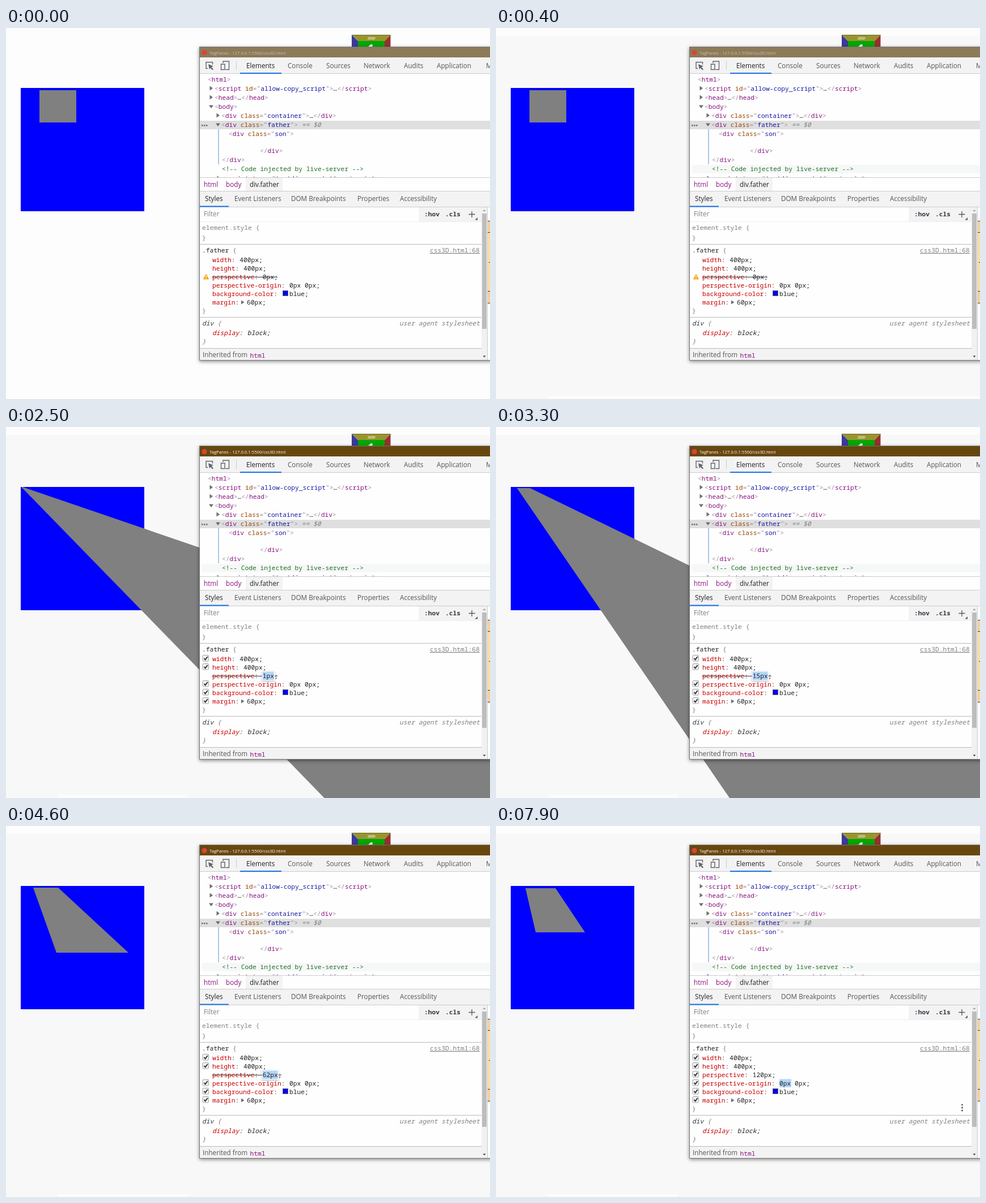
These frames come from a looping animation (854x656 px, 8 s). An HTML page:

```html
<!DOCTYPE html>
<html lang="en">
<head>
<meta charset="utf-8">
<title>Perspective inspector</title>
<style>
  html, body { margin: 0; width: 100%; height: 100%; overflow: hidden; background: #fdfdfd; }
  svg { display: block; }
  text { white-space: pre; fill: #303942; }
  .mono { font: 11.27px "Noto Sans Mono", monospace; }
  .sans { font: 11.7px "Open Sans", sans-serif; fill: #555; }
  .title { font: 7.7px "Open Sans", sans-serif; }
  .italic { font-style: italic; }
  .bold { font-weight: 600; }
  .name { fill: #881280; }
  .attr { fill: #994500; }
  .value { fill: #1a1aa6; }
  .punct { fill: #a08a9e; }
  .prop { fill: #c80000; }
  .plain { fill: #222; }
  .grey { fill: #808080; }
  .comment { fill: #236e25; }
</style>
</head>
<body>
<svg width="854" height="656" viewBox="0 0 854 656">
  <defs>
    <filter id="windowShadow" x="-5%" y="-5%" width="110%" height="110%">
      <feDropShadow dx="0" dy="2" stdDeviation="3" flood-opacity=".45"/>
    </filter>
    <filter id="boxShadow" x="-30%" y="-50%" width="160%" height="200%">
      <feDropShadow dx="0" dy="1" stdDeviation="1.5" flood-opacity=".35"/>
    </filter>
    <clipPath id="treeClip"><path d="M342 80H854V264H342z"/></clipPath>
  </defs>

  <rect width="854" height="656" fill="#fdfdfd"/>
  <rect id="pageTint" y="14" width="854" height="637" fill="#f8f8f8"/>
  <rect id="stripLeft" y="651" width="92" height="5" fill="#f8f8f8"/>
  <rect id="stripRight" x="320" y="651" width="534" height="5" fill="#f8f8f8"/>

  <g id="cube">
    <path fill="#3a3a9c" d="M610 12l11 11v30h-11z"/>
    <path fill="#96302e" d="M678.500 12l-10.500 11v30h10.500z"/>
    <path fill="#98952f" d="M610 12h68.500l-10.500 11h-47z"/>
    <path fill="#00a800" d="M621 23h47v30h-47z"/>
    <path fill="none" stroke="#6c6a22" d="M610 12.500h68.500"/>
    <path fill="none" stroke="#d5d4b0" stroke-width="1.300" d="M638 19.500h11q4-1 1-2.500h-11"/>
    <text x="644" y="43" text-anchor="middle" style="font:bold 20px 'Open Sans',sans-serif;fill:#fff">1</text>
  </g>

  <rect x="26" y="106" width="218" height="218" fill="#00f"/>
  <polygon id="son" fill="#808080"/>

  <g id="overlay">
    <path fill="#f6b26b" opacity=".66" d="M0 14h854v4H0zM0 647h854v4H0z"/>
    <rect y="18" width="854" height="629" fill="#6fa8dc" opacity=".66"/>
    <path fill="#fdfdfd" stroke="#e6e6e6" d="M5 656v-2.500h80l3 2.500"/>
  </g>

  <g id="panel">
    <rect x="341" y="33" width="530" height="555" fill="#777" filter="url(#windowShadow)"/>
    <rect x="342" y="34" width="512" height="553" fill="#fefefe"/>
    <rect id="titleBar" x="342" y="34" width="512" height="18"/>
    <circle cx="350" cy="43.500" r="4.500" fill="#db4437"/>
    <text id="titleText" class="title" x="359" y="46.500">TagPanes - 127.0.0.1:5500/css3D.html</text>

    <path fill="#f3f3f3" d="M342 52h512v28H342zM423 265h65v23h-65zM342 289h512v27H342zM728 317h111v25H728zM342 566h497v21H342z"/>
    <path fill="none" stroke="#ccc" d="M342 80.500h512M342 264.500h512M342 288.500h512M342 316.500h512M406.500 58v16"/>
    <path fill="none" stroke="#eee" d="M342 342.500h497"/>
    <path fill="none" stroke="#bbb" d="M342 382.500h497M342 511.500h497M342 566.500h497"/>
    <path fill="#1a73e8" d="M413 79h73v2h-73zM342 314.500h51v2h-51z"/>
    <g fill="none" stroke="#5f6368" stroke-width="1.400">
      <path d="M356 71.500h-3v-11h11.500v4"/>
      <path d="M383 62v-3h10.500v14.500h-6M379.500 64h6.500v9.500h-6.500z"/>
    </g>
    <path fill="#5f6368" d="M357 64l9 3.500-3.500 1.500 3.500 4-1.500 1.500-4-4-1.500 3z"/>

    <g id="tree" clip-path="url(#treeClip)">
      <rect x="342" y="164" width="512" height="15" fill="#dfdfdf"/>
      <rect id="commentRow" x="346" y="242" width="508" height="15"/>
      <path stroke="#8db4ec" stroke-width="1.500" d="M375 179v62"/>
      <path fill="#6e6e6e" d="M345 171h2.500v2.500H345zM349 171h2.500v2.500H349zM353 171h2.500v2.500H353z"/>
    </g>
    <g id="labels"></g>

    <path stroke="#555" stroke-width="1.300" d="M816.500 329.500h11M822 324v11"/>
    <path fill="#555" d="M832 335v4.500h-4.500z"/>
    <rect x="839" y="317" width="10" height="270" fill="#f1f1f1"/>
    <rect x="840" y="328" width="8" height="204" fill="#bdbdbd"/>
    <path fill="#999" d="M841.500 324l2.500-3 2.500 3z"/>
    <path fill="#444" d="M841.500 579.500l2.500 3 2.500-3z"/>
    <path stroke="#ccc" d="M849.500 317v270"/>
    <rect x="850" y="341" width="4" height="145" fill="#f9cf9f"/>
    <rect x="850" y="362" width="4" height="103" fill="#fbdda2"/>
    <path stroke="#333" d="M850 341.500h4M850 361.500h4M850 465.500h4M850 486.500h4M852 414.500h2"/>
    <rect x="488.500" y="464.500" width="9" height="9" fill="#00f" stroke="#666"/>

    <path id="warning" fill="#f2a90c" stroke="#f2a90c" stroke-linejoin="round" d="M353 435.500l4.500 8.500h-9z"/>
    <path id="warningMark" stroke="#fff" stroke-width="1.300" d="M353 438v3.300M353 442.200v1.300"/>
    <g id="checks"></g>
    <g id="dots" fill="#555"><circle cx="822.500" cy="493" r="1.500"/><circle cx="822.500" cy="498" r="1.500"/><circle cx="822.500" cy="503" r="1.500"/></g>

    <g id="editBox">
      <rect id="editFrame" x="451" y="431.500" height="17" fill="#fff" filter="url(#boxShadow)"/>
      <rect id="editFill" x="452.500" y="432.500" height="15" fill="#b5d5fb"/>
    </g>
    <text class="mono" x="364" y="444"><tspan class="prop">perspective</tspan>: <tspan id="amount" class="plain" dx=".8"></tspan>;</text>
    <path id="strike" stroke="#333" fill="none"/>
  </g>
</svg>

<script>
const LOOP = 8000, CHAR = 6.762, VALUE_GAP = 0.8;
const $ = id => document.getElementById(id);
const set = (id, attrs) => Object.entries(attrs).forEach(([k, v]) => $(id).setAttribute(k, v));
const show = (id, on) => set(id, { visibility: on ? 'visible' : 'hidden' });
const add = (id, markup) => $(id).insertAdjacentHTML('beforeend', markup);
const escapeText = s => s.replace(/&/g, '&amp;').replace(/</g, '&lt;');
const span = (cls, s, dx = 0) => `<tspan class="${cls}" dx="${dx}">${escapeText(s)}</tspan>`;

// y is the middle of the line
const line = (parent, cls, x, y, content) =>
  add(parent, `<text class="${cls}" x="${x}" y="${y + 4}">${content}</text>`);
const mono = (x, y, content, cls = '') => line('labels', 'mono ' + cls, x, y, content);
const sans = (x, y, content, cls = '') => line('labels', 'sans ' + cls, x, y, content);

const TOKENS = /(?<value>(?<==")[\w\/-]+)|(?<attr>(?<= )\w+(?==))|(?<name>(?<=<\/?)\w+)|(?<plain>…)|(?<punct>[^\w…]+|\w)/g;
const highlight = html => [...html.matchAll(TOKENS)].map(match => {
  const [cls] = Object.entries(match.groups).find(([, v]) => v);
  return span(cls, match[0]);
}).join('');

const arrow = (x, y, open) => add('tree',
  `<path fill="#6e6e6e" d="M${x} ${y}${open ? 'm-4 -2.500h8l-4 5.500z' : 'm-2.500 -4.500v8l5.500-4z'}"/>`);

const treeRows = [
  [356, 91, '<html>'],
  [368, 107, '<script id="allow-copy_script">…<\/script>', 'closed'],
  [368, 123, '<head>…</head>', 'closed'],
  [368, 139, '<body>', 'open'],
  [380, 155, '<div class="container">…</div>', 'closed'],
  [380, 171, '<div class="father">', 'open'],
  [393, 187, '<div class="son">'],
  [448, 217, '</div>'],
  [381, 233, '</div>'],
  [381, 266, '<script type="text/javascript">…<\/script>', 'closed']
];
for (const [x, y, html, state] of treeRows) {
  line('tree', 'mono', x, y, highlight(html));
  if (state) arrow(x - 6, y, state === 'open');
}
line('tree', 'mono italic grey', 522, 171, '== $0');
line('tree', 'mono comment', 381, 249, escapeText('<!-- Code injected by live-server -->'));

[[424, 'Elements', 'plain'], [497, 'Console'], [565, 'Sources'], [631, 'Network'],
 [702, 'Audits'], [760, 'Application'], [847, 'Memory']].forEach(([x, s, c]) => sans(x, 67, s, c));
[[349, 'html', 'name'], [388, 'body', 'name'], [430, 'div.father', 'plain']].forEach(([x, s, c]) => sans(x, 277, s, c));
[[351, 'Styles', 'plain'], [403, 'Event Listeners'], [503, 'DOM Breakpoints'],
 [620, 'Properties'], [695, 'Accessibility']].forEach(([x, s, c]) => sans(x, 302, s, c));

sans(349, 329, 'Filter', 'grey');
mono(738, 329, ':hov', 'bold');
mono(775, 329, '.cls', 'bold');
mono(850, 351, 'r');
mono(346, 353, 'element.style {', 'grey');
mono(346, 371, '}', 'grey');
mono(346, 393, span('plain', '.father') + span('grey', ' {'));
mono(748, 393, '<tspan text-decoration="underline">css3D.html:68</tspan>', 'grey');
mono(346, 500, '}', 'grey');
mono(346, 522, 'div' + span('grey', ' {'), 'italic');
mono(694, 522, 'user agent stylesheet', 'italic grey');
mono(346, 554, '}', 'italic grey');
sans(347, 578, 'Inherited from');
mono(430.500, 579, 'html', 'name');

add('labels', '<rect id="originFill" x="500" y="447.500" width="21" height="14.500" fill="#b5d5fb"/>');
const declare = (y, name, value, cls) =>
  mono(364, y, span('prop', name) + ': ' + span('plain', value, VALUE_GAP), cls);
declare(410, 'width', '400px;');
declare(425, 'height', '400px;');
declare(455, 'perspective-origin', '0px 0px;');
declare(470, 'background-color', '');
mono(500, 470, 'blue;', 'plain');
declare(485, 'margin', '');
mono(425, 485, '60px;', 'plain');
declare(539, 'display', 'block;', 'italic');
add('labels', '<path fill="#6e6e6e" d="M415 481.500v7l5.500-3.500z"/>');

for (const y of [409, 424, 439, 454, 469, 484]) {
  add('checks', `<g${y === 439 ? ' id="perspectiveCheck"' : ''}>
    <rect x="347" y="${y - 5.5}" width="10.500" height="10.500" rx="1.500" fill="#f4f4f4" stroke="#a0a0a0"/>
    <path d="M349.500 ${y}l2.200 2.500 4-5.500" fill="none" stroke="#333" stroke-width="2"/></g>`);
}

// A 120px square tilted 30deg about its middle, seen from the parent's top left corner
function sonPoints(perspective) {
  const scale = 0.546, rise = Math.sqrt(3);
  const corner = (x, z) => {
    const s = scale * (perspective ? perspective / (perspective - z) : 1);
    return [26 + x * s, 106 + (60 + z * rise) * s].map(Math.round);
  };
  const near = perspective ? Math.min(30, perspective * 0.98) : 30;
  return [corner(60, -30), corner(180, -30), corner(180, near), corner(60, near)].join(' ');
}

function amountAt(t) {
  if (t < 2500) return 0;
  if (t < 3000) return 1;
  return Math.round(15 + (Math.min(t, 6200) - 3300) * 0.03625);
}

function render(time) {
  const t = Math.floor(time % LOOP / 100) * 100;
  const amount = amountAt(t);
  const editing = t >= 1800 && t < 7700, committed = t >= 7700;
  const focused = t >= 1500, inspecting = t >= 300 && t < 400;

  show('overlay', inspecting);
  show('pageTint', t >= 400);
  show('stripLeft', t >= 400);
  show('stripRight', t >= 2500);
  set('titleBar', { fill: focused ? '#68470f' : '#8d7a58' });
  set('titleText', { style: `fill:${focused ? '#fff' : '#c9c0b0'}` });
  set('commentRow', { fill: inspecting ? '#e9f0fb' : t >= 400 ? '#f6f8f8' : 'none' });

  show('checks', t >= 600);
  set('perspectiveCheck', { display: committed ? 'inline' : 'none' });
  show('dots', t >= 600 && t < 1800 || committed);
  show('warning', t < 1800);
  show('warningMark', t < 1800);
  show('editBox', editing);
  show('originFill', t >= 7800);

  // The label trails the drawing slightly while the shape is huge
  const lead = amount > 1 && amount < 24 ? 1 : 0;
  set('son', { points: sonPoints(amount + lead) });

  const label = amount + 'px', width = label.length * CHAR;
  const valueStart = 364 + 13 * CHAR + VALUE_GAP, valueEnd = valueStart + width;
  $('amount').textContent = label;
  set('editFrame', { width: width + 3 });
  set('editFill', { width });
  show('strike', !committed);
  set('strike', { d: editing
    ? `M364 440.500H${valueStart - 1}M${valueEnd + 1} 440.500h5`
    : `M364 440.500H${valueEnd + 6}` });
}

const start = performance.now();
(function tick() {
  render(performance.now() - start);
  requestAnimationFrame(tick);
})();
</script>
</body>
</html>
```
